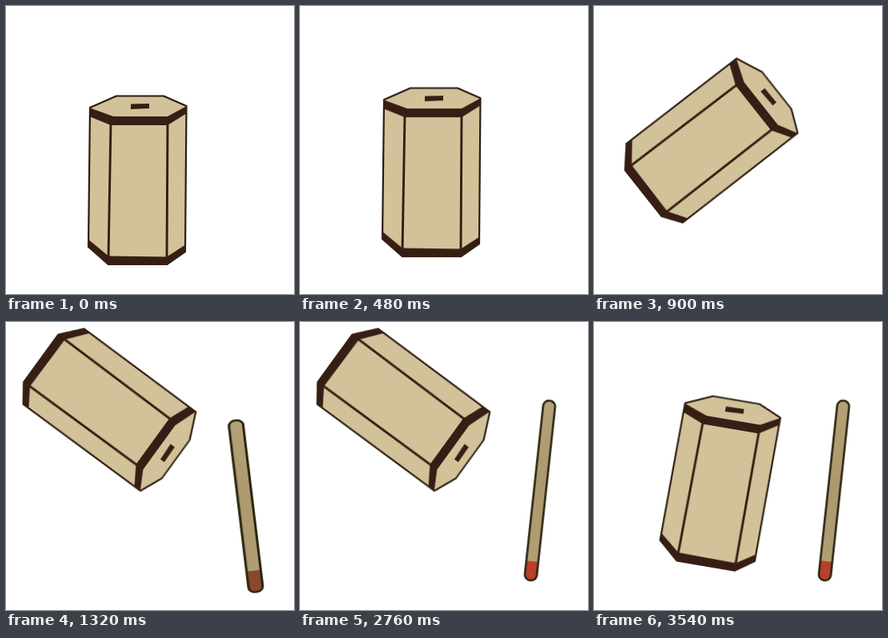
An HTML page without scripts for the animation above (3570 ms loop, 360 by 360 pixels).

```html
<!DOCTYPE html>
<html lang="en">
<head>
<meta charset="utf-8">
<title>Fortune stick box</title>
<style>
  html, body { margin: 0; width: 100%; height: 100%; overflow: hidden; background: #fff; }
  svg { display: block; width: 100%; height: 100%; }

  .box, .stick, .tip { animation: 3570ms linear infinite; }
  .box { transform-origin: 164px 215px; animation-name: shake; stroke-linejoin: round; }
  .stick { transform-origin: 0 0; animation-name: drop; }
  .tip { transform-origin: 0 113px; animation-name: redden; }

  .wood { fill: #d1c299; stroke: #2a1c10; stroke-width: 2.2; }
  .trim { fill: #371e14; }
  .edge { fill: none; stroke: #331d12; stroke-width: 2.9; }
  .outline { fill: none; stroke: #2a2410; stroke-width: 2.6; }

  /* hop, tip over, hold, swing back */
  @keyframes shake {
    0% { transform: translate(0, 0) rotate(0deg); animation-timing-function: ease-in-out; }
    7.563% { transform: translate(0, -101px) rotate(0deg); animation-timing-function: ease-in-out; }
    15.126% { transform: translate(0, 0) rotate(0deg); animation-timing-function: cubic-bezier(.33, 0, .67, .1); }
    25.21% { transform: translate(-18px, -48px) rotate(51deg); }
    28.571%, 93.277% { transform: translate(-32.6px, -106.6px) rotate(126deg); }
    99.16% { transform: translate(-7px, -17.5px) rotate(10deg); }
    100% { transform: translate(0, 0) rotate(0deg); }
  }

  /* slide out of the slot, fall upright, settle */
  @keyframes drop {
    0%, 28.571% { transform: translate(100px, 89px) rotate(-54deg) scale(1, 1); }
    30.252% { transform: translate(184px, 150px) rotate(-54deg) scale(1, 1); }
    33.613% { transform: translate(284px, 222px) rotate(-28deg) scale(1.08, .98); }
    36.975% { transform: translate(299.8px, 230.5px) rotate(-7.1deg) scale(1.19, .956); animation-timing-function: ease-out; }
    40.336%, 100% { transform: translate(300px, 210.7px) rotate(6.2deg) scale(1, 1); }
  }

  @keyframes redden {
    0%, 36.975% { fill: #8b482e; transform: scaleY(1.17); }
    40.336%, 100% { fill: #b8402a; transform: scaleY(1); }
  }
</style>
</head>
<body>
<svg viewBox="0 0 360 360">
  <defs>
    <linearGradient id="grain" x1="0" y1="0" x2="0" y2="1">
      <stop offset="0" stop-color="#b5a176"/>
      <stop offset=".45" stop-color="#ad996e"/>
      <stop offset="1" stop-color="#b1a074"/>
    </linearGradient>
    <clipPath id="outside">
      <path d="M211 152L236 99V0H360V360H100L193 173Z"/>
    </clipPath>
  </defs>

  <g class="box">
    <path class="wood" d="M105 127L138 112.5H197L225.5 125L224 307L201 323H128L103 301Z"/>
    <path class="edge" d="M131 146L128 315M202 146L201 316"/>
    <path class="trim" d="M104 127L134 138H202L226 125V134L202 149H131L104 138Z"/>
    <path class="trim" d="M102 291L128 312.5L201 313.5L225 298V307L201 324H128L102 301Z"/>
    <path class="trim" d="M156 122.5L179 122V128L156 129Z"/>
  </g>

  <g clip-path="url(#outside)">
    <g class="stick">
      <rect x="-7.5" y="-113" width="15" height="226" rx="7" fill="url(#grain)"/>
      <path class="tip" d="M-7.5 89H7.5V106A7 7 0 0 1 .5 113H-.5A7 7 0 0 1-7.5 106Z"/>
      <rect class="outline" x="-7.5" y="-113" width="15" height="226" rx="7"/>
    </g>
  </g>
</svg>
</body>
</html>
```
